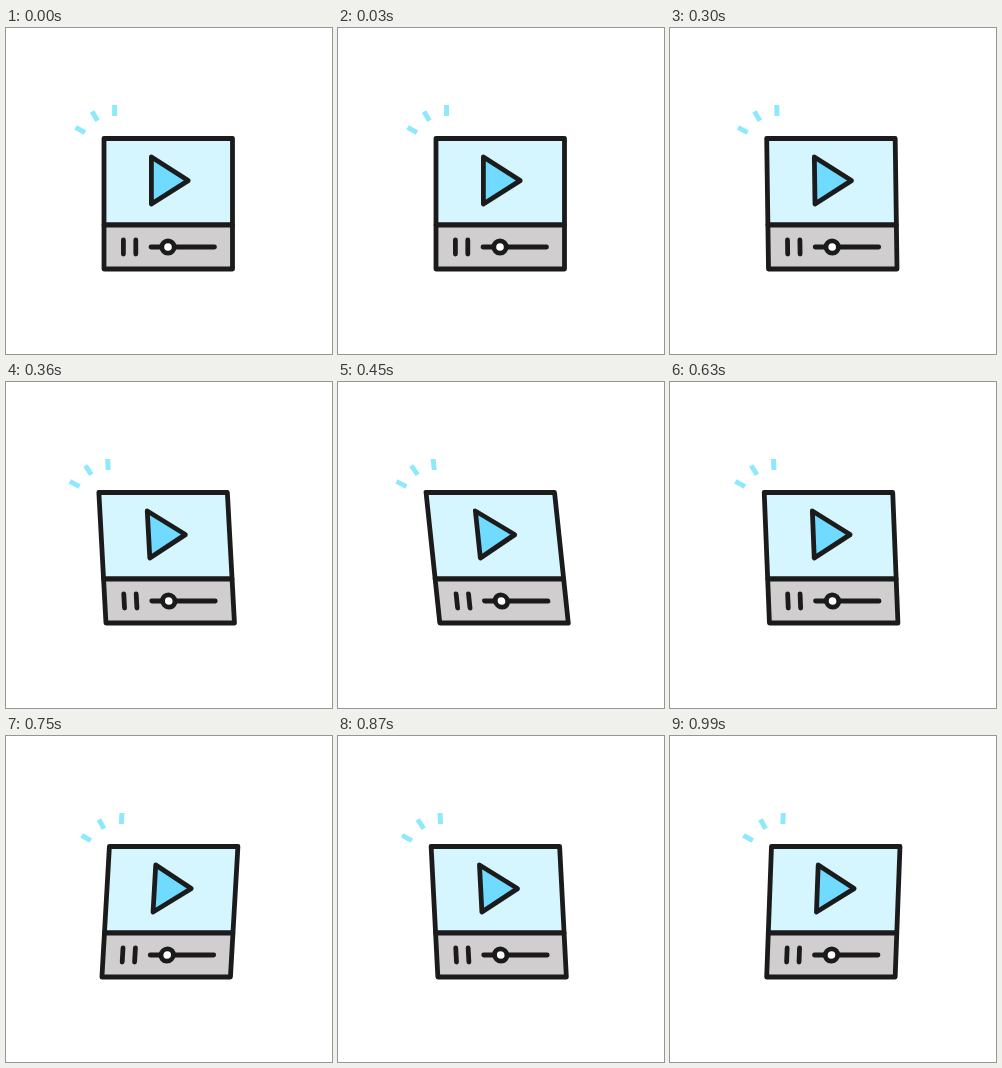
Recreate the animation shown at these times as an HTML page. Size 326 by 326 pixels, loop 1020 ms.

```html
<!DOCTYPE html>
<html lang="en">
<head>
<meta charset="utf-8">
<title>Wobbling video player</title>
<style>
  html, body { margin: 0; width: 100%; height: 100%; overflow: hidden; background: #fff; }
  svg { display: block; width: 100%; height: 100%; }
</style>
</head>
<body>
<svg viewBox="0 0 326 326">
  <g id="player" fill="none" stroke="#1c1b1c" stroke-width="4.8" stroke-linecap="round" stroke-linejoin="round">
    <path d="M69.6 99.3l9.4 5.4M86 83.5l5.5 9.3M108.6 77v11" stroke="#8ee9fd" stroke-width="5" stroke-linecap="butt"/>
    <path d="M98 110.5h128.5V197H98z" fill="#d5f6ff"/>
    <path d="M98 197h128.5v44H98z" fill="#d0cecf"/>
    <path d="M145.4 129l36.8 23.6-36.8 23.4z" fill="#70daff"/>
    <path d="M117.4 212v14M129.8 212v14M145 219h63.5"/>
    <circle cx="162" cy="219" r="6.2" fill="#fff"/>
  </g>
</svg>
<script>
  const LOOP = 1020, STEP = 30;
  const WIND_UP = 280, RELEASE = 569;
  const PIVOT_Y = 205;
  const player = document.getElementById('player');

  // Decaying swing, zero at 645.5 ms, with a half period of 140 ms.
  const swing = t => 0.08 * Math.exp(-0.0032 * (t - 750)) * Math.sin(Math.PI * (t - 645.5) / 140);

  // Horizontal lean per unit of height above the pivot.
  function lean(t) {
    if (t < WIND_UP) return 0;
    if (t >= RELEASE) return swing(t);
    const u = (t - WIND_UP) / (RELEASE - WIND_UP);
    return swing(RELEASE) * (0.25 * u + 0.75 * Math.sin(u * Math.PI / 2));
  }

  const start = performance.now();
  function draw() {
    const elapsed = (performance.now() - start) % LOOP;
    const k = lean(Math.floor(elapsed / STEP) * STEP);
    player.setAttribute('transform', `matrix(1 0 ${-k} 1 ${k * PIVOT_Y} 0)`);
    requestAnimationFrame(draw);
  }
  draw();
</script>
</body>
</html>
```
